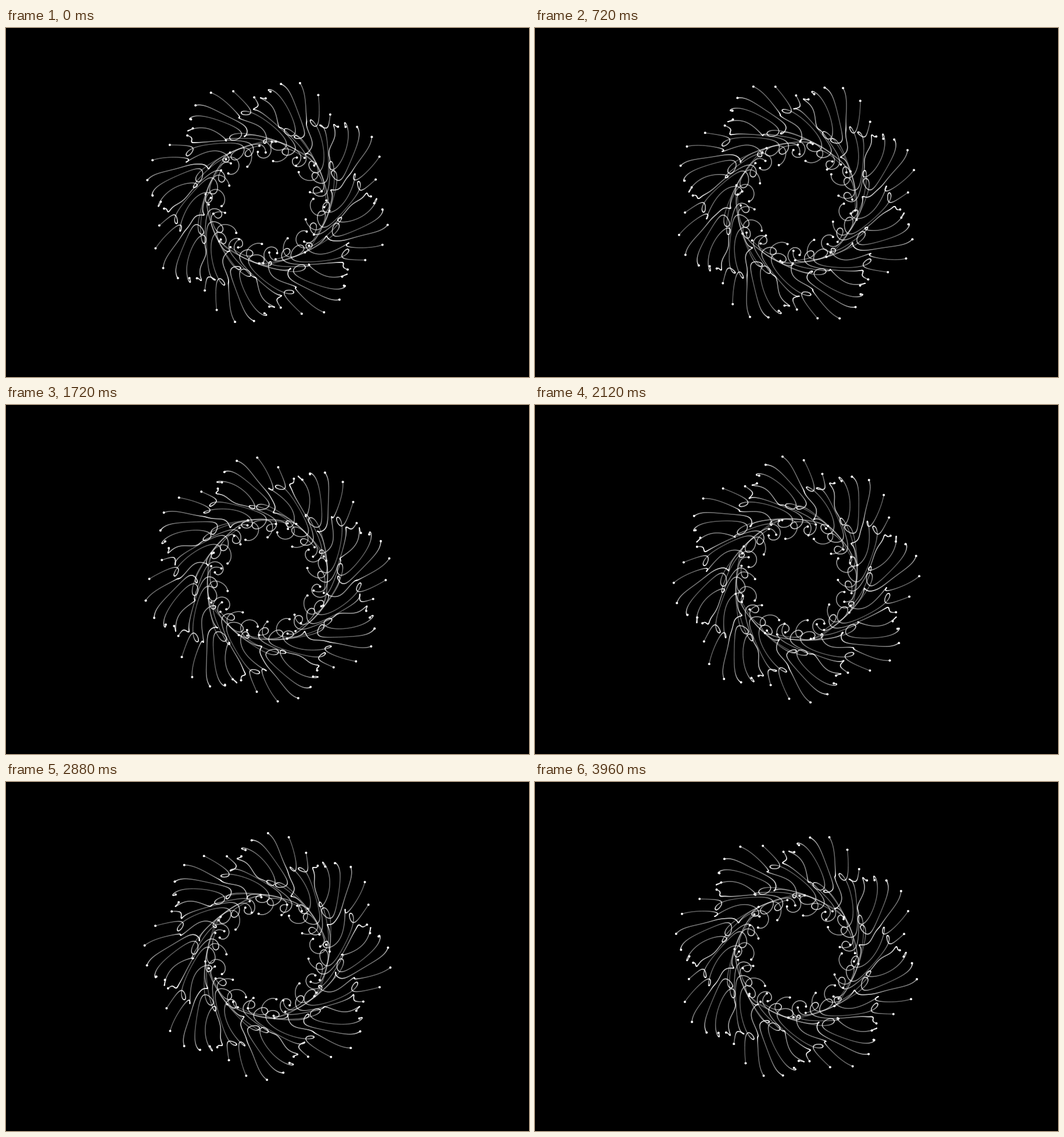
Recreate the animation shown at these times as an HTML page with a canvas. Size 900 by 600 pixels, loop 4 s.

```html
<!DOCTYPE html>
<html lang="en">
<head>
<meta charset="utf-8">
<title>Delayed orbits</title>
<style>
  html, body { margin: 0; width: 100%; height: 100%; overflow: hidden; background: #000; }
  canvas { display: block; width: 900px; height: 600px; }
</style>
</head>
<body>
<canvas id="stage" width="900" height="600"></canvas>
<script>
const ctx = document.getElementById('stage').getContext('2d');
const TAU = Math.PI * 2;
const LOOP = 4000, STEP = 40;
const COUNT = 50;      // strands around the ring, two-fold symmetric
const LOBES = 8;       // orbit phase turns per trip round the ring
const TWIST = 8 / COUNT * TAU;
const DELAY = 2;       // orbit turns of lag along one strand
const POINTS = 500;
const CX = 450, CY = 300;

// Orbits in the local radial/tangential frame: [mean, cos, sin, cos2, sin2]
const outer = {
  shift: 0.6 * TAU,
  radial: [195.3, 17.1, -1.5, 0, 1.4],
  tangent: [-1.7, -9.8, 9.3, 1.3, 0]
};
const inner = {
  shift: 0.16 * TAU,
  radial: [88.7, 15.2, 7.1, 0, -1.8],
  tangent: [1.2, 25.2, -22, 1, 0.8]
};

function wave(k, phase) {
  const c = Math.cos(phase), s = Math.sin(phase);
  return k[0] + k[1] * c + k[2] * s + k[3] * (c * c - s * s) + k[4] * 2 * s * c;
}

// Offset from the ring centre of an orbiting end point.
function orbit(ring, angle, turns) {
  const phase = LOBES * angle + ring.shift - TAU * turns;
  const r = wave(ring.radial, phase), q = wave(ring.tangent, phase);
  const c = Math.cos(angle), s = Math.sin(angle);
  return [r * c - q * s, r * s + q * c];
}

function strandPoint(angle, p, turns) {
  const a = orbit(outer, angle, turns - DELAY * p);
  const b = orbit(inner, angle + TWIST, turns - DELAY * (1 - p));
  return [a[0] + (b[0] - a[0]) * p, a[1] + (b[1] - a[1]) * p];
}

function speck(x, y) {
  const size = 1.5;
  ctx.fillRect(CX + x - size / 2, CY + y - size / 2, size, size);
}

function dot(x, y) {
  ctx.beginPath();
  ctx.arc(CX + x, CY + y, 2, 0, TAU);
  ctx.fill();
}

function drawTwice(draw, [x, y]) {
  draw(x, y);
  draw(-x, -y);
}

function render(turns) {
  ctx.fillStyle = '#000';
  ctx.fillRect(0, 0, 900, 600);
  for (let i = 0; i < COUNT / 2; i++) {
    const angle = i / COUNT * TAU;
    ctx.fillStyle = 'rgba(255,255,255,0.25)';
    for (let j = 0; j <= POINTS; j++) {
      drawTwice(speck, strandPoint(angle, j / POINTS, turns));
    }
    ctx.fillStyle = '#fff';
    drawTwice(dot, strandPoint(angle, 0, turns));
    drawTwice(dot, strandPoint(angle, 1, turns));
  }
}

let shown = -1;
function tick() {
  const step = Math.floor(performance.now() % LOOP / STEP);
  if (step !== shown) {
    shown = step;
    render(step * STEP / LOOP);
  }
  requestAnimationFrame(tick);
}
tick();
</script>
</body>
</html>
```
